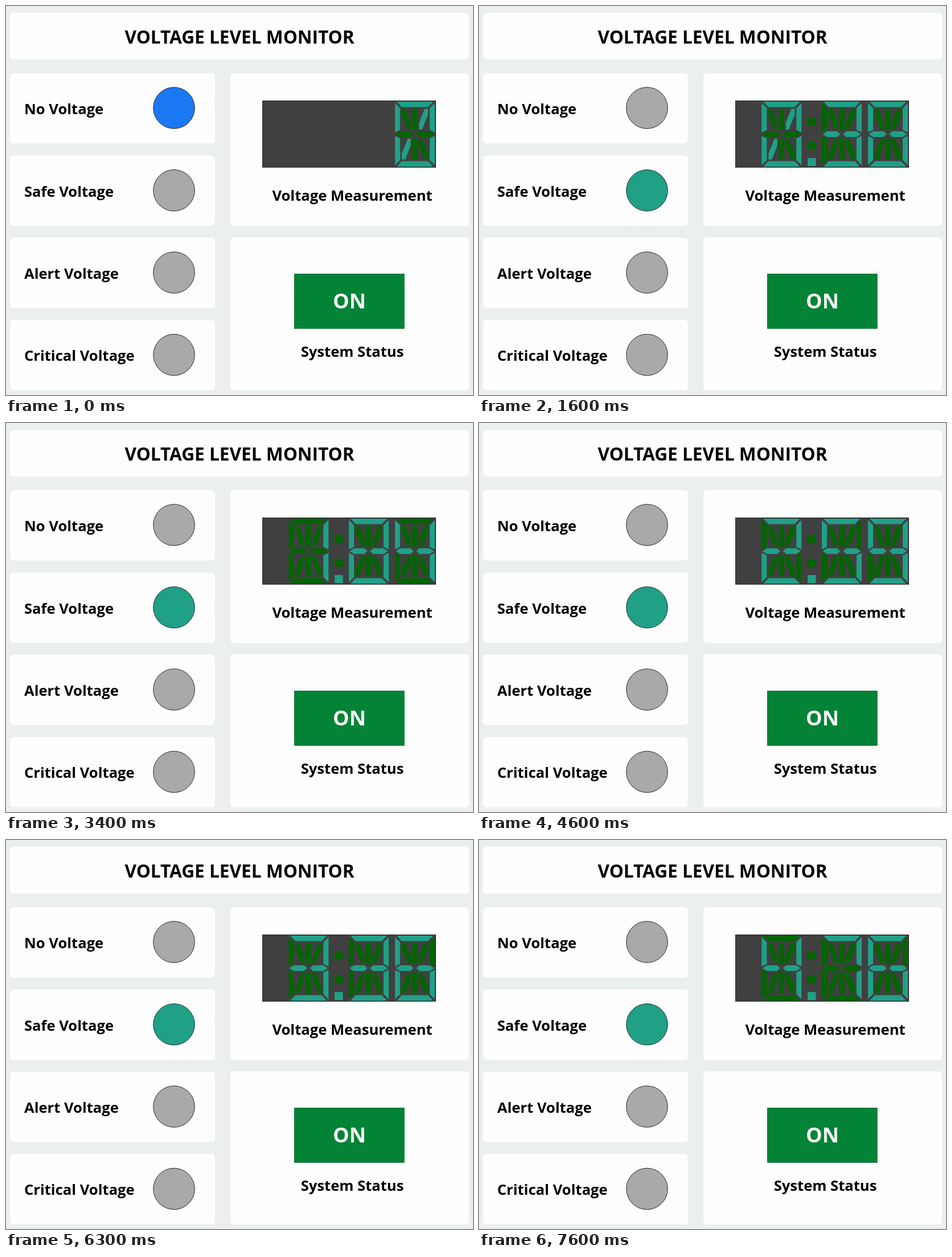
Write an HTML page with a canvas that moves like this. It is 820 px wide and 683 px high and loops after 8 s.

```html
<!DOCTYPE html>
<html lang="en">
<head>
<meta charset="utf-8">
<title>Voltage Level Monitor</title>
<style>
  html, body { margin: 0; width: 100%; height: 100%; overflow: hidden; background: #ebefef; }
  canvas { display: block; }
</style>
</head>
<body>
<canvas id="stage" width="820" height="683"></canvas>
<script>
const ctx = document.getElementById('stage').getContext('2d');
const LOOP = 8000;
const ON = '#20a087', OFF = '#026402', GRAY = '#a9a9a9', BLUE = '#1a78f2';

// [start in ms, reading]
const READINGS = [
  [0, '0'], [1600, '0.38'], [2500, '1.09'], [3300, '1.84'],
  [4600, '2.59'], [5500, '3.36'], [6600, '4.04'], [7500, '4.76']
];

const LAMPS = [
  { label: 'No Voltage', y: 179, color: BLUE },
  { label: 'Safe Voltage', y: 323.8, color: ON },
  { label: 'Alert Voltage', y: 468, color: ON },
  { label: 'Critical Voltage', y: 612.5, color: ON }
];

// Segment outlines around the centre of a digit
const TOP = [[-32, -57], [32, -57], [23, -47.5], [-23, -47.5]];
const SIDE = [[-35, -54.5], [-26, -45.5], [-26, -7.5], [-35, -3]];
const DASH = [[-33.5, 0], [-26, -5], [-8, -5], [-2.5, 0], [-8, 5], [-26, 5]];
const SLANT = [[-23, -44.5], [-17, -44.5], [-7.5, -20], [-7.5, -8], [-12.5, -8], [-23, -34]];
const STEM = [[-4.7, -44.5], [4.7, -44.5], [4.7, -10], [0, -5], [-4.7, -10]];

// name: [outline, horizontal sign, vertical sign]
const SEGMENTS = {
  a: [TOP, 1, 1], d: [TOP, 1, -1],
  f: [SIDE, 1, 1], b: [SIDE, -1, 1], e: [SIDE, 1, -1], c: [SIDE, -1, -1],
  g: [DASH, 1, 1], h: [DASH, -1, 1],
  i: [SLANT, 1, 1], j: [SLANT, -1, 1], k: [SLANT, 1, -1], l: [SLANT, -1, -1],
  m: [STEM, 1, 1], n: [STEM, 1, -1]
};
const GLYPHS = ['abcdefjk', 'bc', 'abdegh', 'abcdgh', 'bcfgh',
                'acdfgh', 'acdefgh', 'abc', 'abcdefgh', 'abcdfgh'];

function card(x, y, w, h) {
  ctx.fillStyle = '#fefefe';
  ctx.beginPath();
  ctx.roundRect(x, y, w, h, 6);
  ctx.fill();
}

function text(str, x, y, size, align = 'center', color = '#000') {
  ctx.font = `bold ${size}px "Open Sans", sans-serif`;
  ctx.textAlign = align;
  ctx.fillStyle = color;
  ctx.fillText(str, x, y);
}

function box(x, y, w, h, fill, edge) {
  ctx.fillStyle = fill;
  ctx.fillRect(x, y, w, h);
  ctx.strokeStyle = edge;
  ctx.lineWidth = 1;
  ctx.strokeRect(x + 0.5, y + 0.5, w - 1, h - 1);
}

function lamp(y, color) {
  ctx.beginPath();
  ctx.arc(295, y, 36.3, 0, Math.PI * 2);
  ctx.fillStyle = color;
  ctx.fill();
  ctx.strokeStyle = '#222b30';
  ctx.lineWidth = 1;
  ctx.stroke();
}

function digit(char, cx, cy) {
  for (const [name, [outline, sx, sy]] of Object.entries(SEGMENTS)) {
    ctx.fillStyle = GLYPHS[char].includes(name) ? ON : OFF;
    ctx.beginPath();
    for (const [x, y] of outline) ctx.lineTo(cx + x * sx, cy + y * sy);
    ctx.fill();
  }
}

function dot(y, color) {
  ctx.fillStyle = color;
  ctx.fillRect(577, y, 14.5, 14);
}

function display(reading) {
  box(450, 166, 305, 117.5, '#404040', '#252525');
  const digits = reading.replace('.', '');
  const centers = [531.3, 637, 718].slice(-digits.length);
  centers.forEach((x, i) => digit(digits[i], x, 225));
  if (reading.includes('.')) {
    dot(196.5, OFF);
    dot(238.5, OFF);
    dot(267, ON);
  }
}

function draw(time) {
  const reading = READINGS.findLast(([start]) => time >= start)[1];
  const active = reading === '0' ? 0 : 1;

  ctx.fillStyle = '#ebefef';
  ctx.fillRect(0, 0, 820, 683);

  card(7, 12, 806, 82);
  text('VOLTAGE LEVEL MONITOR', 410, 66, 31.6);

  LAMPS.forEach(({ label, y, color }, i) => {
    card(7, 118 + i * 144.4, 360, 123.5);
    text(label, 32, y + 10.8, 25.6, 'left');
    lamp(y, i === active ? color : GRAY);
  });

  card(394, 118, 419, 268.5);
  display(reading);
  text('Voltage Measurement', 608, 341.5, 25.6);

  card(394, 406, 419, 269);
  box(506, 470, 193.5, 96.5, '#038335', '#087332');
  text('ON', 603, 531, 36, 'center', '#f5f9f6');
  text('System Status', 608, 616, 25.6);
}

function tick() {
  draw(performance.now() % LOOP);
  requestAnimationFrame(tick);
}
tick();
</script>
</body>
</html>
```
